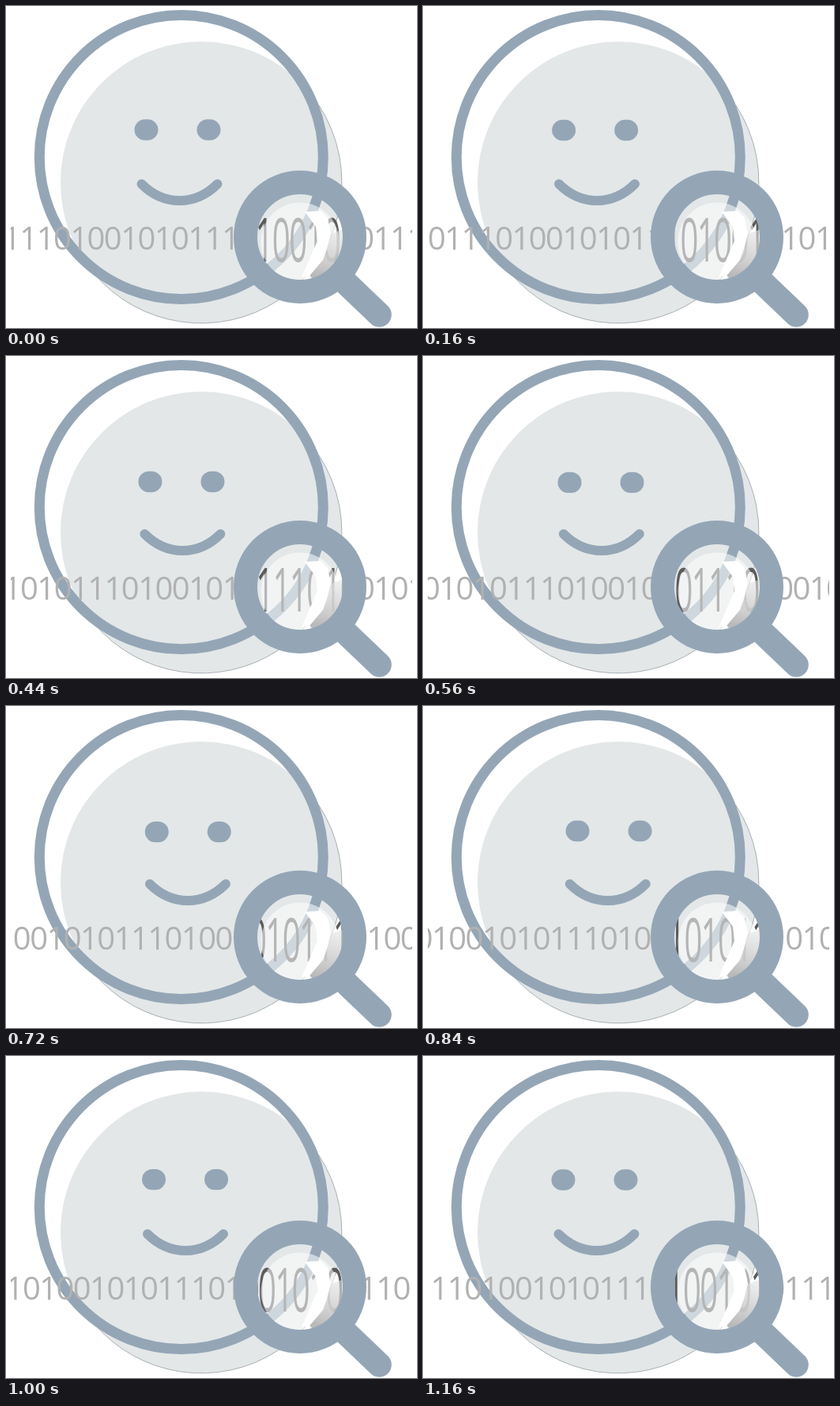
An HTML page with a canvas that plays this animation: 520 px wide and 407 px high, repeating every 1.2 s.

```html
<!DOCTYPE html>
<html lang="en">
<head>
<meta charset="utf-8">
<title>Binary smile</title>
<style>
  html, body { margin: 0; width: 100%; height: 100%; overflow: hidden; background: #fff; }
  canvas { display: block; }
</style>
</head>
<body>
<canvas id="stage" width="520" height="407"></canvas>
<script>
const ctx = document.getElementById('stage').getContext('2d');
const BLUE = '#94a6b6', LOOP = 1200, STEP = 40;
const BITS = '11101001010', PITCH = 21.3;
const LENS = { x: 372, y: 292, r: 54 };
// vertical drift of the eyes: [time, offset]
const BOB = [[0, 0], [160, .5], [320, 1.5], [600, 3.7], [840, 1.5], [1000, -.4], [1160, 0], [1200, 0]];

function disc(x, y, r, color) {
  ctx.beginPath();
  ctx.arc(x, y, r, 0, 7);
  ctx.fillStyle = color;
  ctx.fill();
}

function arc(x, y, r, width, color, from = 0, to = Math.PI * 2) {
  ctx.beginPath();
  ctx.arc(x, y, r, from, to);
  ctx.lineWidth = width;
  ctx.strokeStyle = color;
  ctx.stroke();
}

function poly(points, fill) {
  ctx.beginPath();
  points.forEach(p => ctx.lineTo(...p));
  ctx.fillStyle = fill;
  ctx.fill();
}

function clipped(makePath, draw) {
  ctx.save();
  ctx.beginPath();
  makePath();
  ctx.clip();
  draw();
  ctx.restore();
}

function mix(keys, t) {
  const i = keys.findIndex(k => k[0] > t);
  const [t0, a] = keys[i - 1], [t1, b] = keys[i];
  return a + (b - a) * (t - t0) / (t1 - t0);
}

// side glance: accelerates to the right, then returns evenly
function glance(t) {
  if (t < 850) return (t / 850) ** 2;
  return Math.max(0, (1160 - t) / 310);
}

function digits(t, color) {
  ctx.font = '40px "Open Sans", "Noto Sans", sans-serif';
  ctx.textAlign = 'center';
  ctx.fillStyle = color;
  const n = BITS.length, start = 7.5 + PITCH * n * t / LOOP;
  for (let i = -n - 1; i < 26; i++) {
    ctx.fillText(BITS[(i + 2 * n) % n], start + i * PITCH, 0);
  }
}

function face(t) {
  const shift = glance(t), dx = shift * 18.5, dy = mix(BOB, t);
  ctx.fillStyle = BLUE;
  for (const x of [177.5, 256.5]) {
    ctx.beginPath();
    ctx.roundRect(x - 15 + dx, 143.3 + dy, 30, 26.4, 13.2);
    ctx.fill();
  }
  const mx = 219.5 + shift * 14.6;
  ctx.beginPath();
  ctx.moveTo(mx - 48, 225);
  ctx.bezierCurveTo(mx - 20, 253, mx + 20, 253, mx + 48, 225);
  ctx.lineWidth = 12;
  ctx.lineCap = 'round';
  ctx.strokeStyle = BLUE;
  ctx.stroke();
}

function glass(t) {
  ctx.save();
  ctx.translate(0, 322.5);
  ctx.scale(1, 1.92);
  digits(t, '#5c5c5c');
  ctx.restore();
  disc(372, 298, 49.5, 'rgba(255,255,255,.55)');

  const shade = ctx.createLinearGradient(416, 285, 398, 342);
  shade.addColorStop(0, 'rgba(225,225,225,.6)');
  shade.addColorStop(1, '#b9b9b9');
  poly([[411, 288], [428, 282], [428, 330], [390, 348], [384, 340], [401, 320]], shade);
  poly([[378, 260], [398, 259], [407, 268], [411, 288], [406, 307], [401, 321],
        [384, 341], [374, 343], [387, 313], [394, 297], [392, 279]], '#fff');
}

function draw(t) {
  ctx.fillStyle = '#fff';
  ctx.fillRect(0, 0, 520, 407);
  disc(247, 223, 178, '#e3e7e8');
  arc(247, 223, 178, .7, '#8b9698', -.58, 2.44);
  arc(221.8, 191, 179.5, 13, BLUE);
  face(t);

  clipped(() => {
    ctx.rect(6, 260, 294, 70);
    ctx.rect(440, 260, 74, 70);
  }, () => {
    ctx.translate(0, 308);
    digits(t, '#b1b1b1');
  });
  clipped(() => ctx.arc(LENS.x, LENS.y, LENS.r + 1, 0, 7), () => glass(t));

  arc(LENS.x, LENS.y, 69, 30, BLUE);
  ctx.beginPath();
  ctx.moveTo(428, 348);
  ctx.lineTo(472.3, 390.3);
  ctx.lineWidth = 31;
  ctx.lineCap = 'round';
  ctx.stroke();
}

function frame() {
  draw(Math.floor(performance.now() / STEP) * STEP % LOOP);
  requestAnimationFrame(frame);
}
frame();
</script>
</body>
</html>
```
